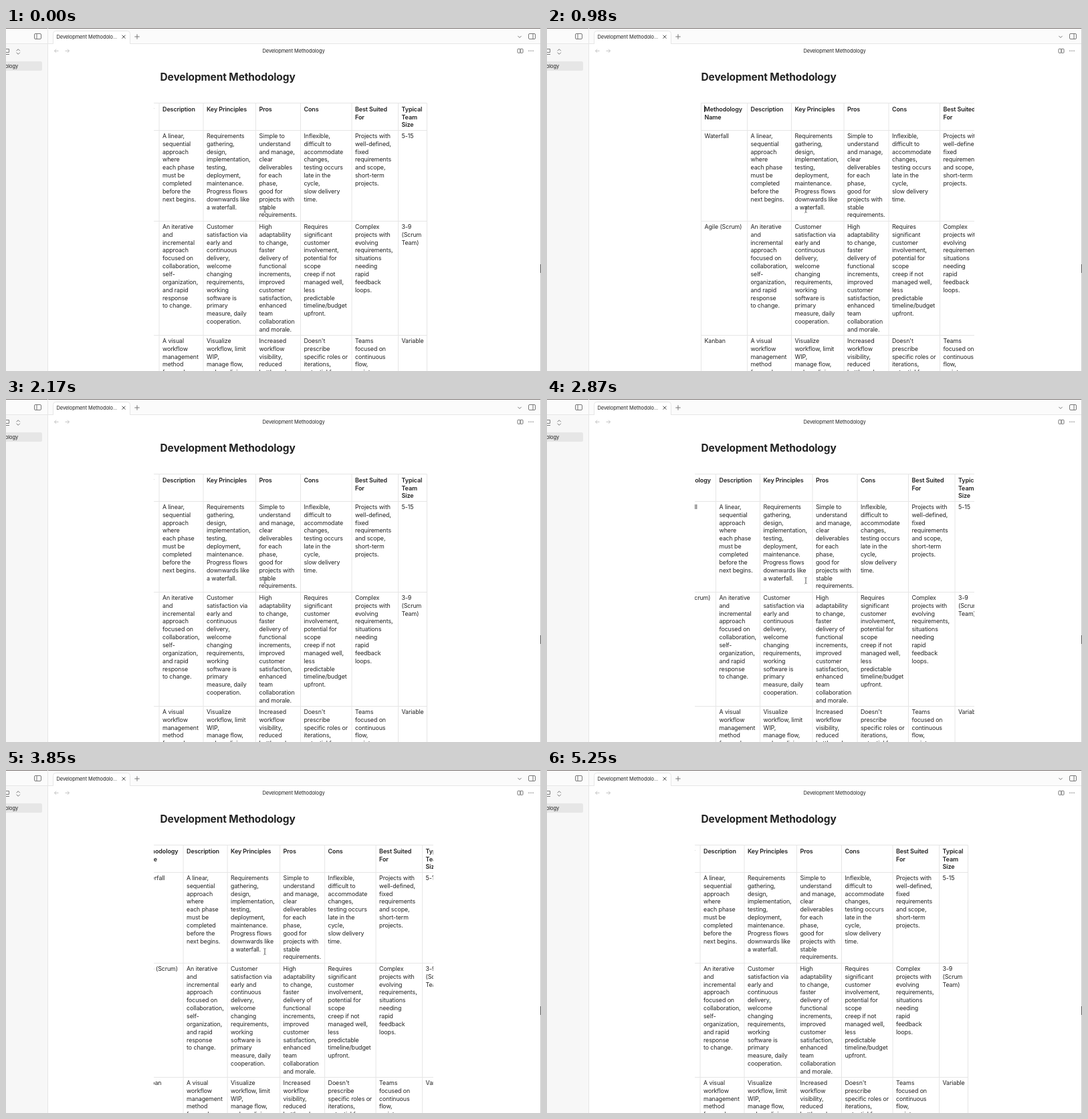
Recreate the animation shown at these times as an HTML page with a canvas. Size 800 px wide and 514 px high, loop 5.32 s.

```html
<!DOCTYPE html>
<html lang="en">
<head>
<meta charset="utf-8">
<title>Development Methodology</title>
<style>
  html, body { margin: 0; width: 100%; height: 100%; overflow: hidden; background: #fff; }
  canvas { display: block; width: 800px; height: 514px; }
</style>
</head>
<body>
<canvas id="stage"></canvas>
<script>
const W = 800, H = 514, LOOP = 5320, STEP = 70;
const canvas = document.getElementById('stage');
const ctx = canvas.getContext('2d');
const dpr = window.devicePixelRatio || 1;
canvas.width = W * dpr;
canvas.height = H * dpr;

const INK = '#222', ICON = '#777', FAINT = '#c4c4c4', RULE = '#e6e6e6', PANEL = '#f7f7f7';
const SCROLL_MAX = 70.5, LINE = 11.85, ROW_PADDING = 5.4;
const VIEW = { left: 221, right: 639, top: 112.5 };

// Cells are separated by "|", lines inside a cell by "/"; "~" stands for a literal slash.
const TABLE = [
  'Methodology/Name|Description|Key Principles|Pros|Cons|Best Suited/For|Typical/Team/Size',
  'Waterfall' +
    '|A linear,/sequential/approach/where/each phase/must be/completed/before the/next begins.' +
    '|Requirements/gathering,/design,/implementation,/testing,/deployment,/maintenance./Progress flows/downwards like/a waterfall.' +
    '|Simple to/understand/and manage,/clear/deliverables/for each/phase,/good for/projects with/stable/requirements.' +
    '|Inflexible,/difficult to/accommodate/changes,/testing occurs/late in the/cycle,/slow delivery/time.' +
    '|Projects with/well-defined,/fixed/requirements/and scope,/short-term/projects.' +
    '|5-15',
  'Agile (Scrum)' +
    '|An iterative/and/incremental/approach/focused on/collaboration,/self-/organization,/and rapid/response/to change.' +
    '|Customer/satisfaction via/early and/continuous/delivery,/welcome/changing/requirements,/working/software is/primary/measure, daily/cooperation.' +
    '|High/adaptability/to change,/faster/delivery of/functional/increments,/improved/customer/satisfaction,/enhanced/team/collaboration/and morale.' +
    '|Requires/significant/customer/involvement,/potential for/scope/creep if not/managed well,/less/predictable/timeline~budget/upfront.' +
    '|Complex/projects with/evolving/requirements,/situations/needing/rapid/feedback/loops.' +
    '|3-9/(Scrum/Team)',
  'Kanban' +
    '|A visual/workflow/management/method/focused on' +
    '|Visualize/workflow, limit/WIP,/manage flow,/make policies' +
    '|Increased/workflow/visibility,/reduced/bottlenecks' +
    "|Doesn't/prescribe/specific roles or/iterations,/potential for" +
    '|Teams/focused on/continuous/flow,/maintenance' +
    '|Variable'
].map(row => row.split('|').map(cell => cell.split('/').map(s => s.replace('~', '/'))));

const columnX = [230.5, 299.5, 365.5, 444, 511, 587.5, 657, 700];

// Each row is as tall as its longest cell.
let nextY = VIEW.top;
const rowY = TABLE.map(row => {
  const y = Math.floor(nextY) + 0.5;
  nextY += Math.max(...row.map(cell => cell.length)) * LINE + ROW_PADDING;
  return y;
});

// Swipes alternate between the two ends of the table; power shapes the ease-out.
const SWIPES = [
  { start: 70, steps: 7, power: 2 },
  { start: 1050, steps: 2, power: 1 },
  { start: 1330, steps: 4, power: 2 },
  { start: 1890, steps: 5, power: 1.07 },
  { start: 2870, steps: 3, power: 1 },
  { start: 3850, steps: 5, power: 3 }
];

function scrollAt(t) {
  let right = 1;
  SWIPES.forEach(({ start, steps, power }, i) => {
    if (t < start) return;
    const u = Math.min(1, (Math.floor((t - start) / STEP) + 1) / steps);
    const eased = 1 - (1 - u) ** power;
    right = i % 2 ? eased : 1 - eased;
  });
  return right * SCROLL_MAX;
}

function box(x, y, w, h, fill) {
  ctx.fillStyle = fill;
  ctx.fillRect(x, y, w, h);
}

function rounded(x, y, w, h, r, fill, stroke) {
  ctx.beginPath();
  ctx.roundRect(x, y, w, h, r);
  ctx.lineWidth = 1;
  if (fill) { ctx.fillStyle = fill; ctx.fill(); }
  if (stroke) { ctx.strokeStyle = stroke; ctx.stroke(); }
}

function line(color, x1, y1, x2, y2) {
  ctx.strokeStyle = color;
  ctx.lineWidth = 1;
  ctx.beginPath();
  ctx.moveTo(x1, y1);
  ctx.lineTo(x2, y2);
  ctx.stroke();
}

const across = (color, x, y, w) => line(color, x, y, x + w, y);
const down = (color, x, y, h) => line(color, x, y, x, y + h);

// A chevron whose tip is at (x, y), pointing along (dx, dy).
function chevron(color, x, y, dx, dy, size = 2.6) {
  ctx.strokeStyle = color;
  ctx.lineWidth = 1;
  ctx.beginPath();
  ctx.moveTo(x - (dx - dy) * size, y - (dy + dx) * size);
  ctx.lineTo(x, y);
  ctx.lineTo(x - (dx + dy) * size, y - (dy - dx) * size);
  ctx.stroke();
}

function arrow(x, y, dir) {
  across(FAINT, x - 3, y, 6);
  chevron(FAINT, x + dir * 3, y, dir, 0);
}

function text(str, x, y, size, weight, spacing, align = 'left') {
  ctx.font = `${weight} ${size}px Inter, sans-serif`;
  ctx.letterSpacing = spacing + 'px';
  ctx.textAlign = align;
  ctx.fillStyle = INK;
  ctx.fillText(str, x, y);
}

const label = (str, x, y, align) => text(str, x, y, 7.45, 400, -0.08, align);

function panelIcon(x, divider) {
  rounded(x + 0.5, 8.5, 10, 8, 1.5, null, ICON);
  down(ICON, x + divider, 8.5, 8);
}

function drawSidebar() {
  box(0, 24, 62, H, PANEL);
  down(RULE, 62.5, 0, H);
  rounded(-6, 50, 60, 14, 2.5, RULE);
  label('ology', 18, 59.8, 'right');
  rounded(-5, 31.5, 9.5, 5, 0, null, ICON);
  across(ICON, 0, 39.5, 5);
  chevron(ICON, 18.2, 31.7, 0, -1);
  chevron(ICON, 18.2, 39.3, 0, 1);
}

function drawTabBar() {
  box(0, 0, W, 23, '#fbfbfb');
  across(RULE, 0, 23.5, W);
  rounded(70.5, 4.5, 115, 24, 4, '#fff', RULE);
  box(66, 24, 124, 6, '#fff');
  label('Development Methodolo...', 75.5, 16.2);
  line('#444', 173.5, 10.7, 178.5, 15.7);
  line('#444', 178.5, 10.7, 173.5, 15.7);
  across(ICON, 192.3, 13, 7.4);
  down(ICON, 196, 9.3, 7.4);
  panelIcon(42, 4);
  panelIcon(781, 7);
  chevron(ICON, 768, 14.5, 0, 1);
  box(0, 0, W, 1, '#77706f');
}

function drawHeader() {
  arrow(75.5, 34.3, -1);
  arrow(91.5, 34.3, 1);
  label('Development Methodology', 430, 37, 'center');
  rounded(765, 31.3, 4, 6, 0.8, null, ICON);
  rounded(769, 31.3, 4, 6, 0.8, null, ICON);
  for (let i = -1; i <= 1; i++) rounded(784.2 + i * 3, 33.5, 1.6, 1.6, 0.8, ICON);
  text('Development Methodology', 230.5, 79.4, 15.5, 700, -0.12);
}

function drawTable(scroll, caret) {
  ctx.save();
  ctx.beginPath();
  ctx.rect(VIEW.left, 100, VIEW.right - VIEW.left, H);
  ctx.clip();
  ctx.translate(-scroll, 0);
  const left = columnX[0], width = columnX.at(-1) - left;
  rowY.forEach(y => across(RULE, left, y, width));
  columnX.forEach(x => down(RULE, x, VIEW.top, H));
  TABLE.forEach((row, r) => row.forEach((cell, c) => cell.forEach((str, i) => {
    const x = columnX[c] + 5;
    const y = rowY[r] + i * LINE;
    if (r) text(str, x, y + 11.4, 8.9, 400, -0.1);
    else text(str, x, y + 12.2, 9, 600, -0.12);
  })));
  if (caret) box(235, 116, 1, 10, INK);
  ctx.restore();
}

function drawPointer(x, y) {
  down('#555', x, y - 3.5, 7);
  chevron('#555', x, y - 3.5, 0, 1, 1.6);
  chevron('#555', x, y + 3.5, 0, -1, 1.6);
}

function draw(t) {
  ctx.setTransform(dpr, 0, 0, dpr, 0, 0);
  box(0, 0, W, H, '#fff');
  drawTabBar();
  drawSidebar();
  drawHeader();
  const caret = (t >= 490 && t < 1050) || (t >= 3570 && t < 3850);
  drawTable(scrollAt(t), caret);
  if (t < 4340) drawPointer(387, 272);
  box(799, 0, 1, H, '#ccc');
  box(799, 354, 1, 13, '#555');
}

const origin = performance.now();
function frame() {
  draw((performance.now() - origin) % LOOP);
  requestAnimationFrame(frame);
}
frame();
</script>
</body>
</html>
```
